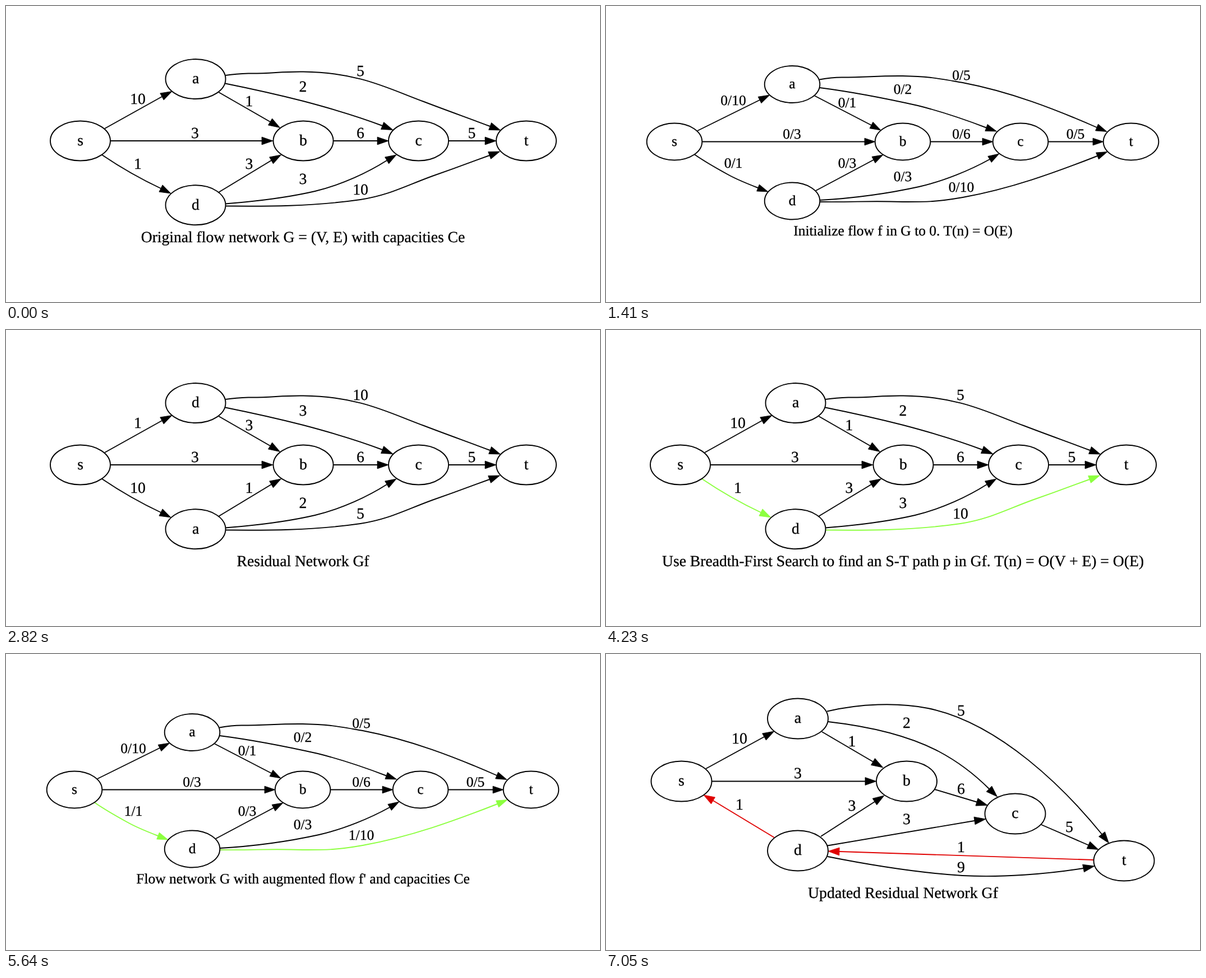
An HTML page that plays this animation: 1059 by 529 pixels, repeating every 8 s.

```html
<!DOCTYPE html>
<html lang="en">
<head>
<meta charset="utf-8">
<title>Max flow</title>
<style>
html, body { margin: 0; width: 100%; height: 100%; overflow: hidden; background: #fff; }
svg { display: block; width: 1059px; height: 529px; }
text {
  font-family: "Liberation Serif", "Times New Roman", serif;
  text-anchor: middle; text-rendering: geometricPrecision;
  fill: #000; stroke: #000; stroke-width: 0.3;
}
ellipse, path { fill: none; stroke: #000; stroke-width: 1.9; }
.head { stroke-width: 0.8; }
</style>
</head>
<body>
<svg id="stage" viewBox="0 0 1059 529"></svg>
<script>
// Edge rows: curve, arrow tip x, y, label centre x, y.
const wide = {
  size: 27.6, rx: 53.5, ry: 35.5, caption: 422.3,
  nodes: { s: [132.5, 241], a: [338, 130.5], b: [530, 241], c: [735.5, 241], d: [338, 355.8], t: [927.5, 241] },
  edges: [
    ['M176 219L278 162', 296, 152.5, 235, 166],
    ['M186 241L456 241', 476, 241, 337, 227],
    ['M171 266C202 287 242 310 276 326', 294, 335, 235, 282],
    ['M391 124C405 122 418 121 432 120.5C475 121 487 117 530 117.5C631 119 680 147 745 171C784 186 826 201 863 215', 881.5, 222, 632, 116],
    ['M391 138.5C433 147 483 158 530 170C579 183 632 199 671 214', 690, 221.5, 529.5, 144],
    ['M379 154L471 207', 488.5, 217.5, 433.5, 170],
    ['M583.5 241L662 241', 682, 241, 632, 227],
    ['M789 241L854 241', 874, 241, 830.5, 227],
    ['M379 333L473 276', 490.5, 266, 433.5, 282],
    ['M391 353.5C436 350 499 343 551 331C600 319 646 297 679 276', 696, 266, 529.5, 309],
    ['M391 357.5C457 358 543 359 632 346C683 338 711 322 760 304C794 292 829 279 862 267', 880.5, 260, 632, 328]
  ]
};

const narrow = {
  size: 25.5, rx: 49.3, ry: 33, caption: 410,
  nodes: { s: [122, 242.5], a: [332, 140], b: [529, 242.5], c: [739, 242.5], d: [332, 348.5], t: [936, 242.5] },
  edges: [
    ['M163 223L274 168', 292, 159, 227, 169],
    ['M172 242.5L461 242.5', 480, 242.5, 331.5, 229],
    ['M158 265.5C176 278 197 290 217 301C233 310 253 318 271 325', 289, 332, 227, 281],
    ['M380.5 131.5C394 129 407 127.5 420 127.5C468 127.5 480 124.5 529 125C577 126 589 129 636 137C720 153 800 184 875 217', 893, 224.5, 633.5, 124],
    ['M381 146C431 152.5 498 165 556 178C596 188 643 204 678 217.5', 696.5, 224, 529, 149],
    ['M372 160.5L473 213', 490, 222, 430, 173],
    ['M578.5 242.5L671 242.5', 690, 242.5, 633.5, 229],
    ['M788.5 242.5L868 242.5', 887, 242.5, 837, 229],
    ['M374 330L477 275', 494, 266, 430, 281],
    ['M381.5 347C434 344 499 336 558 323C602 313 650 293 684 274', 701, 264, 529, 305],
    ['M381.5 350C447 351 463 347.5 529 350C575 350 590 350 636 342C720 327 800 298 876 268', 894, 260.5, 633.5, 324]
  ]
};

const updated = {
  size: 27.8, rx: 54, ry: 36, caption: 436.2,
  nodes: { s: [134.5, 227.5], a: [342, 115.5], b: [536, 227.5], c: [729.5, 285.5], d: [342, 351.5], t: [923.5, 369.5] },
  edges: [
    ['M178 205L282 148', 300, 138, 238, 151],
    ['M188.5 227.5L462 227.5', 482, 227.5, 342, 213],
    ['M300 328L191 262', 174, 252, 238, 269],
    ['M394 102.5C452 89 518 86 574 97C702 123 820 243 884 322', 896.5, 338, 633, 101],
    ['M396 121C457 128 532 142 593 174C627 192 659 217 683 241', 697.5, 255, 536, 123],
    ['M385 139L476 192.5', 494, 203, 438.5, 156],
    ['M586 242L661 264.5', 680.5, 270.5, 633, 241],
    ['M776 305L860 341.5', 878, 349.5, 826, 309],
    ['M383 326L479 264', 496, 253, 438.5, 271],
    ['M395 342.5L657 298', 677, 295, 536, 295],
    ['M395 362C470 377 557 391 635 396C706 400 787 393 851 383', 871, 379, 633, 381],
    ['M869.5 368L416 353', 396, 352.5, 633, 345]
  ]
};

const green = '#8cff3f', red = '#e00000';
const swapped = { ...wide, nodes: { ...wide.nodes, a: wide.nodes.d, d: wide.nodes.a } };

const scenes = [
  { layout: wide, labels: '10 3 1 5 2 1 6 5 3 3 10', caption: 'Original flow network G = (V, E) with capacities Ce' },
  { layout: narrow, labels: '0/10 0/3 0/1 0/5 0/2 0/1 0/6 0/5 0/3 0/3 0/10', caption: 'Initialize flow f in G to 0. T(n) = O(E)' },
  { layout: swapped, labels: '1 3 10 10 3 3 6 5 1 2 5', caption: 'Residual Network Gf' },
  { layout: wide, labels: '10 3 1 5 2 1 6 5 3 3 10', tint: { 2: green, 10: green },
    caption: 'Use Breadth-First Search to find an S-T path p in Gf. T(n) = O(V + E) = O(E)' },
  { layout: narrow, labels: '0/10 0/3 1/1 0/5 0/2 0/1 0/6 0/5 0/3 0/3 1/10', tint: { 2: green, 10: green },
    caption: "Flow network G with augmented flow f' and capacities Ce" },
  { layout: updated, labels: '10 3 1 5 2 1 6 5 3 3 9 1', tint: { 2: red, 11: red }, caption: 'Updated Residual Network Gf' }
];

const STEP = 1410, LOOP = 8000;

function add(parent, tag, attrs, text) {
  const el = document.createElementNS('http://www.w3.org/2000/svg', tag);
  for (const k in attrs) el.setAttribute(k, attrs[k]);
  if (text) el.textContent = text;
  return parent.appendChild(el);
}

function drawEdge(g, d, tx, ty, size, color) {
  const [bx, by] = d.match(/[\d.]+/g).slice(-2).map(Number);
  const len = Math.hypot(tx - bx, ty - by), half = size / 4;
  const nx = -(ty - by) / len * half, ny = (tx - bx) / len * half;
  add(g, 'path', { d, style: `stroke:${color}` });
  add(g, 'path', {
    class: 'head',
    d: `M${bx + nx} ${by + ny}L${tx} ${ty}L${bx - nx} ${by - ny}Z`,
    style: `fill:${color};stroke:${color}`
  });
}

function drawScene({ layout, labels, caption, tint = {} }) {
  const { size, rx, ry, nodes, edges } = layout;
  const g = add(document.getElementById('stage'), 'g', { 'font-size': size });
  const names = labels.split(' ');
  edges.forEach(([d, tx, ty, x, y], i) => {
    drawEdge(g, d, tx, ty, size, tint[i] || '#000');
    add(g, 'text', { x, y: y + size * 0.31 }, names[i]);
  });
  for (const name in nodes) {
    const [cx, cy] = nodes[name];
    add(g, 'ellipse', { cx, cy, rx, ry });
    add(g, 'text', { x: cx, y: cy + size * 0.28 }, name);
  }
  add(g, 'text', { x: 529.5, y: layout.caption }, caption);
  return g;
}

const key = (time, opacity) => ({ offset: Math.min(1, time / LOOP), opacity, easing: 'steps(1, end)' });

scenes.forEach((scene, i) => {
  const start = i * STEP, end = start + STEP;
  const keys = [key(start, 1), key(end, 0)];
  if (start > 0) keys.unshift(key(0, 0));
  if (end < LOOP) keys.push(key(LOOP, 0));
  drawScene(scene).animate(keys, { duration: LOOP, iterations: Infinity });
});
</script>
</body>
</html>
```
